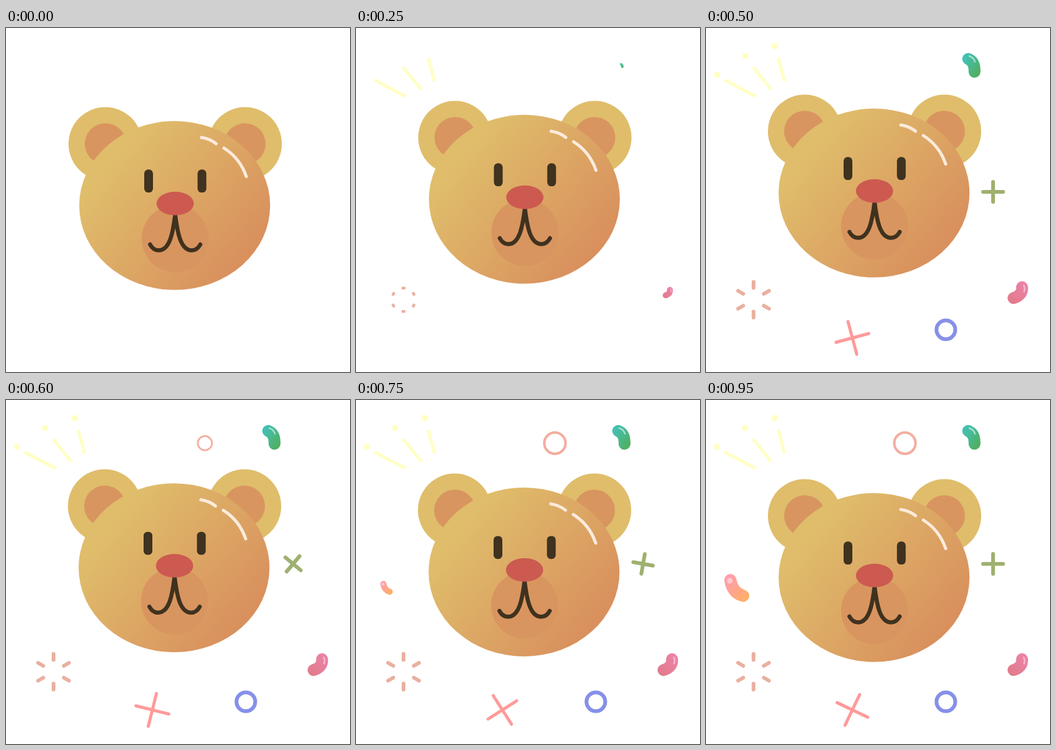
Recreate the animation shown at these times as an HTML page. Size 550 by 550 pixels, loop 1 s.

```html
<!DOCTYPE html>
<html lang="en">
<head>
<meta charset="utf-8">
<title>Bear</title>
<style>
html, body { margin: 0; width: 100%; height: 100%; overflow: hidden; background: #fff; }
svg { display: block; width: 100vw; height: 100vh; }
.line { fill: none; stroke-linecap: round; stroke-linejoin: round; }
</style>
</head>
<body>
<svg viewBox="0 0 550 550">
  <defs>
    <linearGradient id="fur" gradientUnits="userSpaceOnUse" x1="175" y1="210" x2="375" y2="375">
      <stop stop-color="#dfbd6b"/><stop offset="1" stop-color="#d9905d"/>
    </linearGradient>
    <linearGradient id="mint" gradientUnits="userSpaceOnUse" x1="412" y1="52" x2="438" y2="68">
      <stop stop-color="#43c0b2"/><stop offset="1" stop-color="#50af62"/>
    </linearGradient>
    <linearGradient id="rose" gradientUnits="userSpaceOnUse" x1="512" y1="410" x2="486" y2="438">
      <stop stop-color="#eb82a8"/><stop offset="1" stop-color="#e27b8b"/>
    </linearGradient>
    <linearGradient id="peach" gradientUnits="userSpaceOnUse" x1="32" y1="285" x2="66" y2="315">
      <stop stop-color="#ff9db0"/><stop offset="1" stop-color="#ffae68"/>
    </linearGradient>
  </defs>

  <g class="line" stroke="#ffffc4" stroke-width="5">
    <path data-at="50" d="M31 84L78 108.5"/>
    <path data-at="150" d="M76.5 64L103 97"/>
    <path data-at="250" d="M116 49.5L125 83.5"/>
  </g>
  <g fill="#ffffc4">
    <circle data-at="350" cx="17.5" cy="75" r="5"/>
    <circle data-at="400" cx="62.5" cy="45" r="5"/>
    <circle data-at="450" cx="110" cy="29" r="5"/>
  </g>

  <path id="burst" class="line" stroke="#e9b0a0" stroke-width="6"/>

  <g id="green" class="line">
    <path d="M419.3 49.5Q430 54 429.3 70" stroke="url(#mint)" stroke-width="19"/>
    <path d="M421 45Q428 47 430 54" stroke="#a9dfce" stroke-width="2.5"/>
  </g>
  <g id="pink" class="line">
    <path d="M505.3 414.5Q506.5 427 491.7 431.7" stroke="url(#rose)" stroke-width="19"/>
    <path d="M508 411.5Q510.5 416 508.5 421.5" stroke="#f5bccb" stroke-width="2.5"/>
  </g>
  <g id="orange" class="line">
    <path d="M39 288Q42 308 59.3 313" stroke="url(#peach)" stroke-width="19.5"/>
    <circle cx="38" cy="289" r="4.5" fill="#ffc9d0"/>
  </g>

  <circle id="ring" cx="318" cy="69" r="17" class="line" stroke="#f4ad9f" stroke-width="4"/>
  <circle id="blue" cx="383.5" cy="482.5" r="15" class="line" stroke="#8590e8" stroke-width="6"/>
  <path id="cross" class="line" stroke="#ff9a9a" stroke-width="5" d="M234 468.5V522.5M207 495.5H261"/>
  <path id="plus" class="line" stroke="#9fb070" stroke-width="6" d="M459 246V278M443 262H475"/>

  <g id="bear">
    <g fill="#dfbd6b"><circle cx="158.8" cy="185.2" r="58.8"/><circle cx="382.2" cy="185.2" r="58.8"/></g>
    <g fill="#d9955f"><circle cx="159" cy="185.2" r="33"/><circle cx="382" cy="185.2" r="33"/></g>
    <ellipse cx="269.7" cy="283.8" rx="152.6" ry="135" fill="url(#fur)"/>
    <circle cx="270.5" cy="337" r="53.6" fill="#d9955f"/>
    <g fill="#3f321f">
      <rect x="221" y="226.3" width="14" height="36.8" rx="6.3"/>
      <rect x="306.3" y="226.3" width="14" height="36.8" rx="6.3"/>
    </g>
    <path class="line" stroke="#3f321f" stroke-width="6.5" d="M230.3 346C234 353 239 355.5 244 355.5C262 355.5 267 327 270.5 298C274 327 279 355.5 297 355.5C302 355.5 307 353 310.7 346"/>
    <ellipse cx="270.5" cy="280.6" rx="29.8" ry="18.8" fill="#cc5a50"/>
    <path class="line" stroke="#fbebdc" stroke-width="5" d="M312.5 175Q326 177 336 185M348.5 192Q374 208 384.2 237.5"/>
  </g>
</svg>
<script>
const LOOP = 1000, STEP = 50;
const $ = id => document.getElementById(id);
const clamp = v => Math.max(0, Math.min(1, v));
const pops = document.querySelectorAll("[data-at]");

// id, centre, start and end of growth
const growing = [
  ["green", 425, 60, 200, 450],
  ["pink", 498.5, 423, 150, 350],
  ["orange", 48.5, 300, 600, 900],
  ["ring", 318, 69, 500, 650],
  ["blue", 383.5, 482.5, 350, 500]
];

// id, centre, first visible time, angle at 500 ms, degrees per ms
const spinning = [
  ["cross", 234, 495.5, 400, -15, 0.29],
  ["plus", 459, 262, 450, 0, 0.4]
];

function show(el, on) {
  el.style.visibility = on ? "visible" : "hidden";
}

function drawBurst(t) {
  const done = t >= 400, el = $("burst");
  const inner = done ? 19 : 16.5;
  const outer = done ? 28.5 : 16.5 + 13 * clamp((t - 200) / 150);
  let d = "";
  for (let i = 0; i < 6; i++) {
    const a = i * Math.PI / 3, x = Math.sin(a), y = -Math.cos(a);
    d += `M${76 + x * inner} ${434.5 + y * inner}L${76 + x * outer} ${434.5 + y * outer}`;
  }
  el.setAttribute("d", d);
  el.style.strokeLinecap = done ? "round" : "butt";
  show(el, t > 200);
}

function draw(t) {
  const lift = t < 500 ? t / 500 : clamp((950 - t) / 450);
  $("bear").setAttribute("transform", `translate(${-clamp(t / 500)} ${-20 * lift})`);

  for (const el of pops) show(el, t >= +el.dataset.at);
  drawBurst(t);

  for (const [id, x, y, from, to] of growing) {
    const s = clamp((t - from) / (to - from));
    $(id).setAttribute("transform", `translate(${x} ${y}) scale(${s}) translate(${-x} ${-y})`);
    show($(id), s > 0);
  }
  for (const [id, x, y, from, angle, speed] of spinning) {
    $(id).setAttribute("transform", `rotate(${angle + speed * (t - 500)} ${x} ${y})`);
    show($(id), t >= from);
  }
}

let start = null;
function tick(now) {
  if (start === null) start = now;
  draw(Math.floor((now - start) % LOOP / STEP) * STEP);
  requestAnimationFrame(tick);
}
draw(0);
requestAnimationFrame(tick);
</script>
</body>
</html>
```
